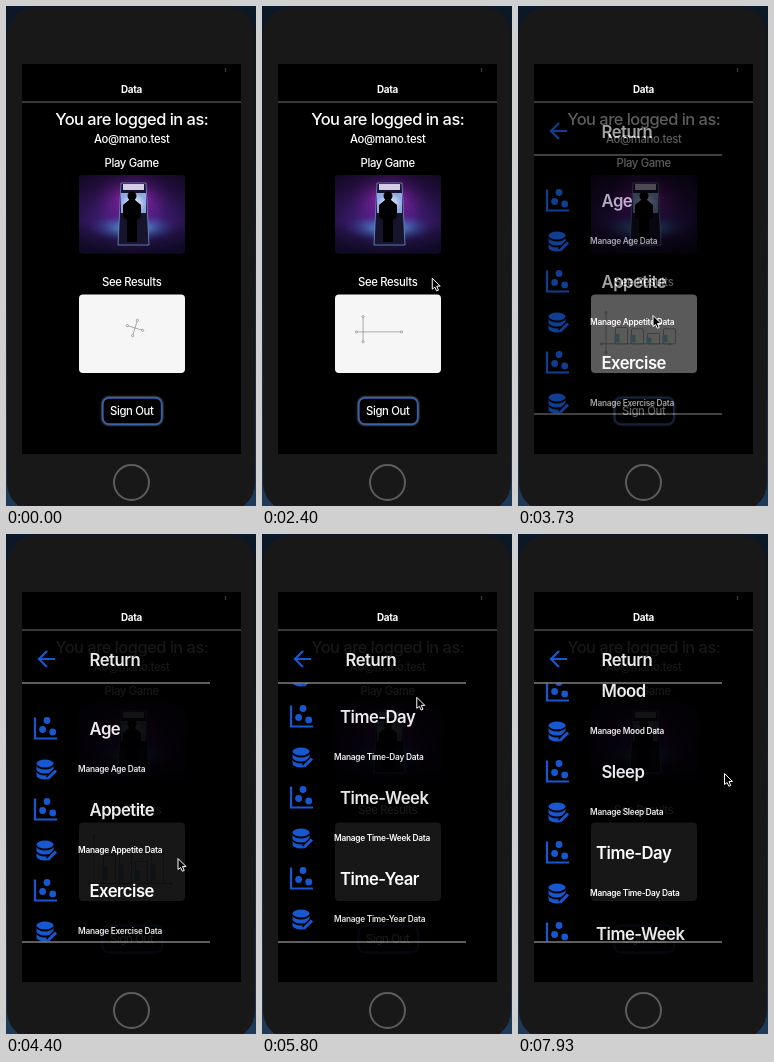
An HTML page for the animation above (8000 ms loop, 250 px wide and 500 px high).

```html
<!DOCTYPE html>
<html lang="en">
<head>
<meta charset="utf-8">
<title>Data</title>
<style>
  html, body { margin: 0; width: 100%; height: 100%; overflow: hidden; background: #0a1828; }
  svg { display: block; width: 100vw; height: 100vh; }
  text { font-family: Inter, Roboto, sans-serif; letter-spacing: -.03em; fill: #fff; }
  .mid { text-anchor: middle; font-size: 11.3px; font-weight: 500; }
  .heading { font-size: 16.4px; }
  .bar { font-size: 9.9px; font-weight: 700; }
  .title { font-size: 16.7px; font-weight: 600; }
  .manage { font-size: 8.3px; font-weight: 600; }
</style>
</head>
<body>
<svg viewBox="0 0 250 500">
  <defs>
    <linearGradient id="desk" x2="0" y2="1">
      <stop offset=".3" stop-color="#0a1828"/>
      <stop offset="1" stop-color="#1e3a58"/>
    </linearGradient>
    <linearGradient id="wall" x2="0" y2="1">
      <stop stop-color="#30104a"/>
      <stop offset=".6" stop-color="#42207a"/>
      <stop offset="1" stop-color="#120c2a"/>
    </linearGradient>
    <radialGradient id="pink">
      <stop stop-color="#c42ccc" stop-opacity=".75"/>
      <stop offset="1" stop-color="#7a1ca0" stop-opacity="0"/>
    </radialGradient>
    <radialGradient id="teal">
      <stop stop-color="#5cd0ec" stop-opacity=".9"/>
      <stop offset="1" stop-color="#3858c0" stop-opacity="0"/>
    </radialGradient>
    <radialGradient id="shade" r=".7">
      <stop offset=".35" stop-color="#0e0820" stop-opacity="0"/>
      <stop offset="1" stop-color="#0e0820" stop-opacity=".9"/>
    </radialGradient>
    <radialGradient id="display">
      <stop stop-color="#f4f8ff"/>
      <stop offset="1" stop-color="#8ea8e0"/>
    </radialGradient>
    <filter id="soft" x="-20%" y="-40%" width="140%" height="180%"><feGaussianBlur stdDeviation="1"/></filter>
    <clipPath id="photoClip"><rect x="73" y="169" width="106" height="78.5" rx="4"/></clipPath>
    <clipPath id="listClip"><rect x="16" y="149.5" width="219" height="258"/></clipPath>

    <g id="scatter" fill="#1a62e6">
      <path d="M-11-11V10H11" fill="none" stroke="#1a62e6" stroke-width="2.2"/>
      <circle cx="-3.4" cy="1" r="3.4"/><circle cx="1" cy="-8" r="3.4"/><circle cx="6.7" cy="3.4" r="3.4"/>
    </g>
    <g id="database" fill="#1a62e6">
      <path id="band" d="M-9.5-4a8.5 4 0 0 0 17 0v4a8.5 4 0 0 1-17 0z"/>
      <use href="#band" y="6"/>
      <ellipse cx="-1" cy="-6" rx="8.5" ry="4"/>
      <path d="M2 9l8-8" stroke="#000" stroke-width="6"/>
      <path d="M2 9l8-8" stroke="#1a62e6" stroke-width="3"/>
    </g>
  </defs>

  <rect width="250" height="500" fill="url(#desk)"/>
  <rect x="1" y="1" width="248" height="504" rx="28" fill="#181818"/>
  <circle cx="125.5" cy="476.5" r="17.5" fill="none" stroke="#5c5c5e" stroke-width="2"/>
  <rect x="16" y="58" width="219" height="390"/>
  <path d="M219.5 62v4" stroke="#755" stroke-width=".7"/>
  <text class="mid bar" x="125.5" y="87">Data</text>
  <path d="M16 96h219" stroke="#4a4a4c" stroke-width="1.5"/>

  <text class="mid heading" x="125.7" y="119">You are logged in as:</text>
  <text class="mid" x="125.7" y="137">Ao@mano.test</text>
  <text class="mid" x="125.7" y="161">Play Game</text>
  <g clip-path="url(#photoClip)">
    <rect x="73" y="169" width="106" height="79" fill="url(#wall)"/>
    <ellipse cx="127" cy="194" rx="38" ry="34" fill="url(#pink)"/>
    <ellipse cx="127" cy="222" rx="46" ry="14" fill="url(#teal)"/>
    <rect x="73" y="169" width="106" height="79" fill="url(#shade)"/>
    <path d="M115 177h25l3 62h-31z" fill="#17142e" stroke="#7090d0" stroke-width=".8"/>
    <rect x="117" y="178" width="21" height="6" fill="#d4cce4"/>
    <rect x="115" y="187" width="25" height="20" fill="url(#display)"/>
    <circle cx="126" cy="190" r="4.5"/>
    <path d="M123 194h6l6 5v12l-4 3v22h-10v-22l-4-3v-12z"/>
  </g>

  <text class="mid" x="125.7" y="280">See Results</text>
  <rect x="73" y="288.5" width="106" height="78.5" rx="4" fill="#f6f6f6"/>
  <g id="chart" fill="#f6f6f6" stroke="#777" stroke-width=".6"></g>

  <rect x="97" y="392" width="58.5" height="26" rx="6" fill="none" stroke="#a0a4ac" stroke-width="2" filter="url(#soft)"/>
  <rect x="97" y="392" width="58.5" height="26" rx="6" stroke="#3060c0" stroke-width="1.3"/>
  <text class="mid" x="125.7" y="409">Sign Out</text>

  <g id="drawer">
    <rect x="16" y="97" width="219" height="351"/>
    <path d="M49 125H33M41 117l-8 8 8 8" fill="none" stroke="#1a62e6" stroke-width="2.2"/>
    <text class="title" x="83.5" y="131.5">Return</text>
    <g clip-path="url(#listClip)"><g id="list"></g></g>
    <path d="M16 149h188M16 408h188" stroke="#d0d0d0"/>
  </g>
  <path id="cursor" d="M0 0V11L2.600 9 4.300 12.700 6.200 12 4.500 8H8Z" stroke="#fff"/>
</svg>

<script>
const LOOP = 8000, ROW = 81, MAX_SCROLL = 417;
const el = id => document.getElementById(id);

// Smooth progress from 0 to 1 between two times
function ramp(t, start, end) {
  const p = Math.min(1, Math.max(0, (t - start) / (end - start)));
  return p * p * (3 - 2 * p);
}

const items = ['Age', 'Appetite', 'Exercise', 'Mood', 'Sleep', 'Time-Day', 'Time-Week', 'Time-Year'];
el('list').innerHTML = items.map((name, i) => `
  <g transform="translate(40 ${194.5 + i * ROW})">
    <g id="row-${name}">
      <use href="#scatter"/>
      <text class="title" x="${name.startsWith('Time') ? 38 : 43.5}" y="6.3">${name}</text>
    </g>
    <use href="#database" y="41"/>
    <text class="manage" x="32" y="43.5">Manage ${name} Data</text>
  </g>`).join('');

// A spinning cross turns into chart axes, then bars rise from them
function drawChart(t) {
  const shift = ramp(t, 530, 1400), spread = ramp(t, 1500, 2900), rise = ramp(t, 3300, 4200);
  const angle = 0.3 * (1 - ramp(t, 0, 270));
  const x0 = 129 + 4 * shift - 45 * spread;
  const y0 = 322 + 5.5 * spread + 22 * rise;
  const arms = [
    8 + 3 * shift + 6 * spread + 30 * rise,
    8 - 5 * shift + 50 * spread + 24 * rise,
    8 + 4 * shift - 3 * spread,
    8 + 4 * shift - 7.5 * spread
  ];
  const nodes = arms.map((length, i) => {
    const a = angle + (i - 1) * Math.PI / 2;
    return [x0 + length * Math.cos(a), y0 + length * Math.sin(a)];
  });
  const [top, right, bottom, left] = nodes;

  let shapes = `<path d="M${top}L${bottom}M${left}L${right}"/>`;
  for (let i = 0; i < 4; i++) {
    const h = (i ? 0 : 6 * ramp(t, 2850, 3100)) + (22 + 10 * (i % 2)) * rise;
    const x = x0 + 9.5 + i * 16;
    if (h) shapes += `<rect x="${x}" y="${y0 - h}" width="12" height="${h}" rx="1"/>
      <rect x="${x - 1}" y="${y0 - h * .6}" width="5" height="${h * .5}" fill="#8cccdc" stroke="none"/>`;
  }
  for (const [x, y] of nodes) shapes += `<circle cx="${x}" cy="${y}" r="1.1"/>`;
  el('chart').innerHTML = shapes;
  el('chart').setAttribute('opacity', 1 - ramp(t, 4600, 4900));
}

// A fling past the end springs back; a second drag coasts part of the way up
function scrollAt(t) {
  const bounce = 33 * (ramp(t, 4900, 5270) - ramp(t, 5310, 5680));
  const coast = Math.min(1, Math.max(0, (t - 6820) / 750));
  return MAX_SCROLL * ramp(t, 4730, 5270) + bounce - 136 * (1 - (1 - coast) ** 3);
}

// Each move: start time, end time, destination
const moves = [
  [1150, 1470, 228, 211], [1500, 3050, 135, 309.5], [3900, 4350, 172, 324.5],
  [4730, 5270, 145, 151.5], [5500, 6500, 190, 206], [6820, 7200, 206.5, 239.5]
];
function cursorAt(t) {
  return moves.reduce(([x, y], [start, end, toX, toY]) => {
    const p = ramp(t, start, end);
    return [x + (toX - x) * p, y + (toY - y) * p];
  }, [254, 226]);
}

function render(t) {
  drawChart(t);
  el('drawer').setAttribute('opacity', .905 * ramp(t, 3350, 3950));
  el('list').setAttribute('transform', `translate(0 ${-scrollAt(t)})`);
  el('row-Time-Day').setAttribute('opacity', 1 - .55 * (ramp(t, 6620, 6740) - ramp(t, 6850, 7050)));
  el('cursor').setAttribute('transform', `translate(${cursorAt(t)})`);
}

function frame() {
  render(performance.now() % LOOP);
  requestAnimationFrame(frame);
}
frame();
</script>
</body>
</html>
```
